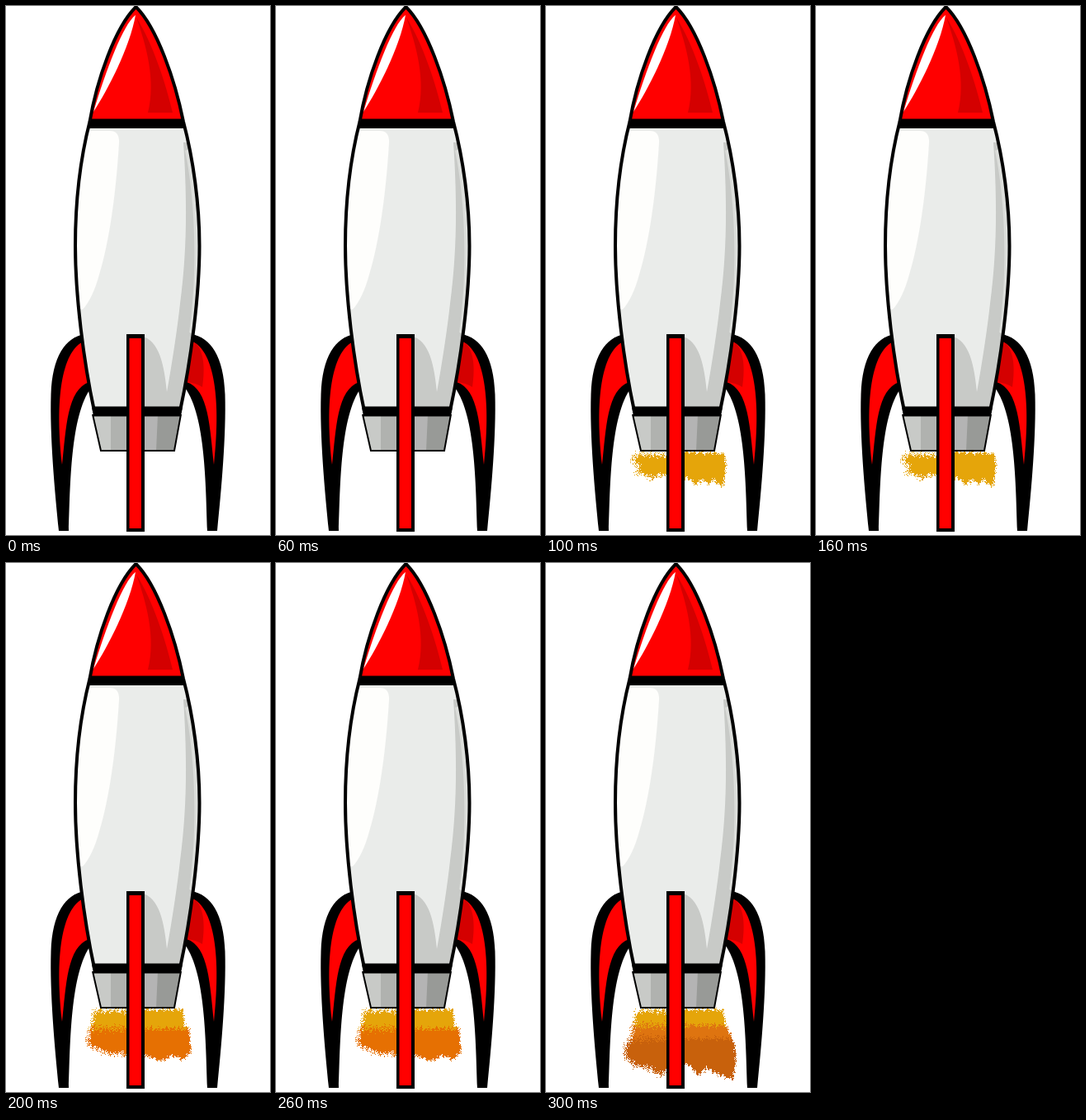
Animation of 320x640 px, one loop 400 ms. Source, as an HTML page with a canvas:

```html
<!DOCTYPE html>
<html lang="en">
<head>
<meta charset="utf-8">
<title>Rocket</title>
<style>
  html, body { margin: 0; width: 100%; height: 100%; overflow: hidden; background: #fff; }
  canvas { display: block; width: 320px; height: 640px; }
</style>
</head>
<body>
<canvas id="stage" width="320" height="640"></canvas>
<script>
const ctx = document.getElementById('stage').getContext('2d');
const STEP = 100;
const YELLOW = '#e5a50a', ORANGE = '#e67002', AMBER = '#de7410', RUST = '#c8610c';

// Each stage: flame outlines left and right of the middle fin, and [start y, colour] bands.
const stages = [
  null,
  {
    left: 'M106 542H156V570L143 567 135 568 127 572 120 566 108 566 114 557 105 553Z',
    right: 'M157 539L215 541 218 556 215 580 207 578 203 570 196 579 190 572 180 579 176 572 157 571Z',
    bands: [[0, YELLOW]]
  },
  {
    left: 'M107 541H156V603L141 593 124 594 112 587 101 585 98 574 104 556Z',
    right: 'M157 540H214L215 556 222 565 224 590 215 600 200 595 190 602 172 597 157 586Z',
    bands: [[0, YELLOW], [563, ORANGE]]
  },
  {
    left: 'M110 541H156V610L140 619 125 611 106 607 96 597 95 585 103 575 106 555Z',
    right: 'M157 540H214L217 558 227 578 230 600 226 624 210 619 195 610 185 620 173 608 157 600Z',
    bands: [[0, YELLOW], [559, AMBER], [575, RUST]]
  }
];

function fill(path, color) {
  ctx.fillStyle = color;
  ctx.fill(new Path2D(path));
}

function outline(path, width) {
  ctx.lineWidth = width;
  ctx.strokeStyle = '#000';
  ctx.stroke(new Path2D(path));
}

function randomFrom(seed) {
  return () => (seed = (seed * 16807) % 2147483647) / 2147483647;
}

// Sprays pixels into an outline; larger fuzz scatters its edge more.
function spray(outlinePath, bands, fuzz, seed) {
  const shape = new Path2D(outlinePath);
  const random = randomFrom(seed);
  for (let y = 537; y < 627; y++) {
    for (let x = 93; x < 233; x++) {
      const dx = (random() - 0.5) * fuzz;
      const dy = (random() - 0.5) * fuzz;
      const lump = Math.sin(x * 1.3) + Math.sin(x * 0.7 + y * 0.4);
      if (!ctx.isPointInPath(shape, x + dx, y + dy + lump)) continue;
      const depth = y + dy * 1.5 + lump;
      ctx.fillStyle = bands.filter(([top]) => depth >= top).pop()[1];
      ctx.fillRect(x, y, 1, 1);
    }
  }
}

function drawSideFin() {
  fill('M95 397C72 401 56 424 54.5 470C53 520 59 585 64 635H76C78 580 78 496 103 462Z', '#000');
  fill('M94 406C71 416 58 465 68 555C73 510 74 464 101 455Z', '#f00');
}

function drawRocket() {
  drawSideFin();
  ctx.save();
  ctx.translate(320, 0);
  ctx.scale(-1, 1);
  drawSideFin();
  ctx.restore();
  fill('M228 407C239 414 242 435 238 461Q230 456 219 455Z', '#d40000');

  fill('M105 494H212L204 538H115Z', '#c8cac7');
  fill('M127 494H150V538H127Z', '#b0b2af');
  fill('M160 494H184V538H160Z', '#b4b4b4');
  fill('M184 494H212L204 538H182Z', '#989a97');
  outline('M105 494L115 538H204L212 494', 2);

  const hull = 'M157.5 1C132 26 110 90 101.5 140C90 185 84 240 84 290C84 350 94 430 107 490' +
    'H211C224 430 234.5 350 234.5 290C234.5 240 227 185 215 140C205 90 183 26 157.5 1Z';
  ctx.save();
  ctx.clip(new Path2D(hull));
  fill('M80 140H240V492H80Z', '#eaecea');
  fill('M80 151H124Q138 150 137 166C133 230 125 285 113 325Q105 354 93 367H80Z', '#fefefc');
  fill('M215 165C220 240 219 300 211 360Q206 405 195 467C191 425 183 402 160 398V490H240V165Z', '#c8cac7');
  fill('M217 175C229 230 233 320 222 395L240 400V165Z', '#dcdedb');
  fill('M80 0H240V140H80Z', '#f00');
  fill('M158 14C170 48 182 90 172 129H202C194 95 178 45 158 14Z', '#d40000');
  fill('M157 11C142 22 121 78 106 128C124 100 150 50 157 11Z', '#fff');
  ctx.restore();
  outline(hull, 4);
  fill('M101 136.5H215L217 148H99Z', '#000');
  fill('M104 484.5H214L212 496.5H106Z', '#000');
}

function drawMiddleFin() {
  fill('M146 397H168V636H146Z', '#000');
  fill('M149.5 402H164V632H149.5Z', '#f00');
}

function draw(index) {
  ctx.fillStyle = '#fff';
  ctx.fillRect(0, 0, 320, 640);
  const flame = stages[index];
  if (flame) {
    spray(flame.left, flame.bands, 8, 71 + index);
    spray(flame.right, flame.bands, 4, 191 + index);
  }
  drawRocket();
  drawMiddleFin();
}

let shown = -1;
const start = performance.now();

function tick() {
  const index = Math.floor((performance.now() - start) / STEP) % stages.length;
  if (index !== shown) draw(shown = index);
  requestAnimationFrame(tick);
}
tick();
</script>
</body>
</html>
```
